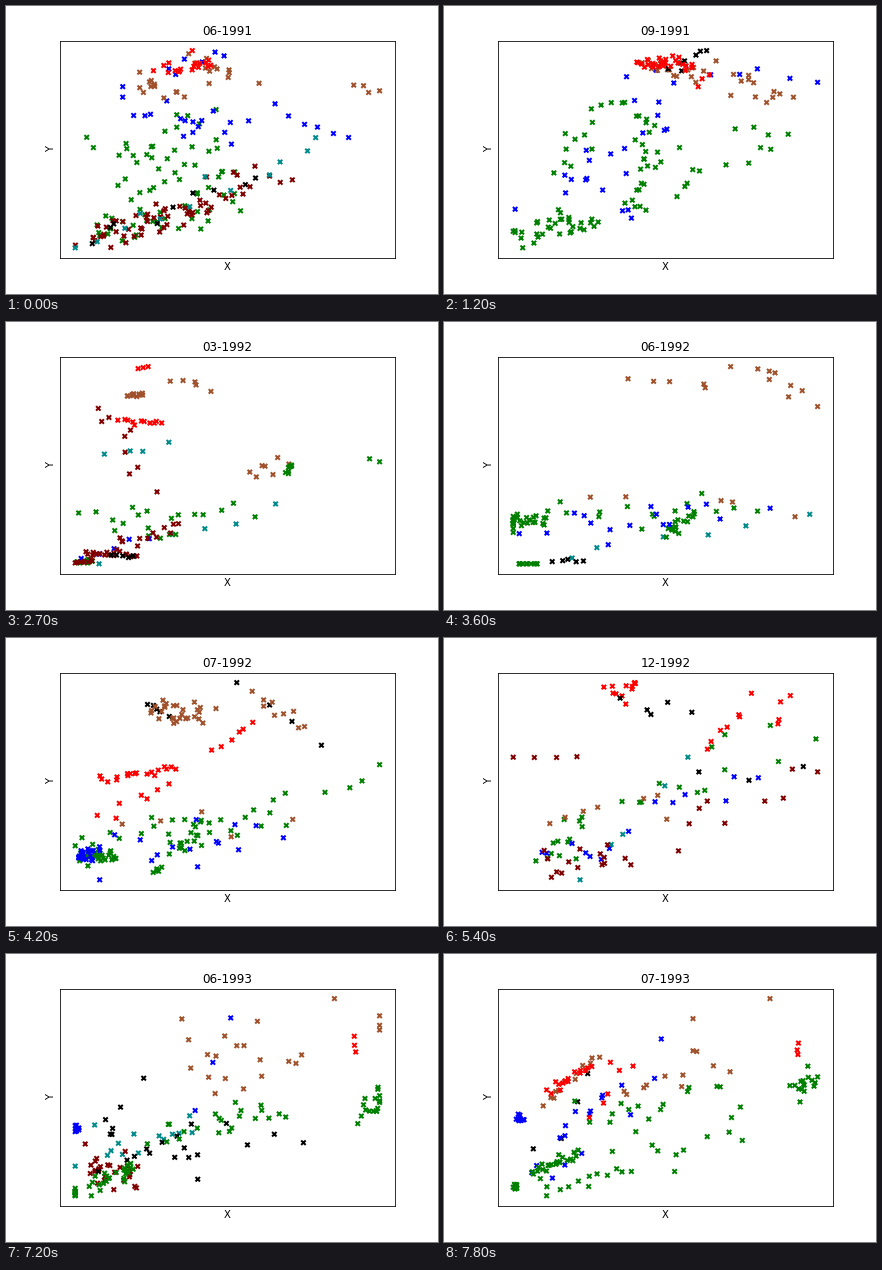
Write a matplotlib script that moves like this. It is 432x288 px and loops after 8000 ms.

```python
import numpy as np
import matplotlib.pyplot as plt
from matplotlib.animation import FuncAnimation

TICK, HOLD, TICKS = 100, 3, 80
MONTHS = "06 07 07 08 09 10 12 12 01 03 04 05".split()
LEFT, RIGHT, TOP, BOTTOM = 69.2, 373.6, 44.6, 241.8
DRIFT = 7

key_months = {}


def month(step, *bands):
    key_months[step] = bands


def band(colour, count, start, end=None, spread=5):
    """Points strewn along a line from start to end, in pixels from the top left."""
    return colour, count, np.array(start), np.array(end or start), spread


month(
    0,
    band("green", 36, (95, 225), (228, 188), 10),
    band("green", 26, (120, 168), (215, 155), 13),
    band("green", 12, (90, 145), (215, 108), 10),
    band("blue", 18, (120, 115), (240, 125), 12),
    band("blue", 6, (160, 71), (228, 55)),
    band("blue", 6, (270, 106), (343, 136), 2),
    band("sienna", 13, (137, 84), (172, 96)),
    band("sienna", 12, (187, 64), (238, 78), 6),
    band("sienna", 4, (350, 86), (373, 92), 2),
    band("red", 18, (162, 72), (208, 66), 4),
    band("maroon", 55, (82, 233), (230, 188), 8),
    band("maroon", 6, (230, 162), (282, 168)),
    band("darkcyan", 12, (69, 238), (328, 141), 7),
    band("black", 9, (89, 227), (255, 172)),
)
month(
    4,
    band("green", 34, (76, 224), (140, 212), 8),
    band("green", 14, (108, 160), (165, 90), 6),
    band("green", 25, (178, 200), (188, 108), 8),
    band("green", 14, (210, 190), (300, 110), 14),
    band("blue", 16, (105, 185), (210, 105), 14),
    band("blue", 5, (134, 170), (180, 214)),
    band("blue", 8, (170, 71), (334, 73)),
    band("sienna", 20, (182, 56), (230, 70), 6),
    band("sienna", 13, (255, 60), (310, 102), 7),
    band("black", 7, (210, 66), (238, 45), 4),
    band("red", 22, (180, 58), (215, 58), 3),
    band("red", 9, (222, 58), (236, 80)),
)
month(
    9,
    band("sienna", 12, (122, 74), (138, 71), 1),
    band("sienna", 5, (160, 64), (212, 67)),
    band("sienna", 7, (243, 152), (284, 139)),
    band("red", 11, (113, 99), (157, 101), 1.5),
    band("red", 3, (132, 47), (142, 45), 0),
    band("darkcyan", 4, (105, 134), (154, 115), 6),
    band("darkcyan", 6, (100, 231), (266, 181), 6),
    band("green", 8, (282, 148), spread=2),
    band("green", 10, (70, 240), (86, 239), 1),
    band("green", 13, (82, 188), (240, 192), 7),
    band("green", 7, (108, 213), (180, 209)),
    band("green", 2, (363, 137), (373, 140), 0),
    band("blue", 5, (78, 236), (140, 215), 3),
    band("maroon", 8, (70, 240), (86, 239), 1),
    band("maroon", 18, (80, 232), (130, 232), 1.5),
    band("maroon", 9, (92, 79), (143, 165), 7),
    band("maroon", 12, (112, 222), (172, 208), 4),
    band("black", 5, (105, 233), (126, 233), 1),
)
month(
    14,
    band("green", 28, (72, 215), (108, 213), 3.5),
    band("green", 18, (165, 210), (192, 190), 6),
    band("green", 18, (76, 197), (268, 175), 8),
    band("green", 7, (240, 165), (372, 131), 8),
    band("green", 5, (148, 229), spread=2.5),
    band("blue", 18, (70, 218), (88, 212), 4),
    band("blue", 16, (96, 210), (252, 190), 12),
    band("black", 5, (137, 66), (157, 79), 2),
    band("black", 4, (226, 45), (304, 104), 3),
    band("sienna", 28, (145, 68), (188, 80), 7),
    band("sienna", 9, (237, 58), (290, 90)),
    band("sienna", 5, (116, 180), (265, 180), 8),
    band("red", 18, (92, 141), (166, 128), 2.5),
    band("red", 7, (92, 170), (158, 152)),
    band("red", 6, (198, 112), (243, 92)),
)
month(
    18,
    band("red", 12, (163, 62), (195, 52)),
    band("red", 7, (264, 112), (305, 68)),
    band("red", 4, (332, 92), (348, 66), 3),
    band("black", 5, (171, 76), (246, 87), 6),
    band("black", 3, (259, 137), (367, 135), 6),
    band("green", 8, (177, 165), (282, 150), 9),
    band("green", 5, (270, 106), (367, 115), 9),
    band("green", 13, (99, 222), (142, 188), 7),
    band("blue", 7, (188, 185), (315, 140), 8),
    band("blue", 7, (105, 214), (170, 222), 6),
    band("darkcyan", 5, (133, 238), (235, 112), 8),
    band("sienna", 7, (106, 182), (231, 166), 7),
    band("maroon", 15, (105, 234), (180, 210), 8),
    band("maroon", 9, (226, 190), (373, 135), 14),
    band("maroon", 4, (70, 123), (134, 123), 0.5),
)
month(
    21,
    band("red", 17, (93, 105), (145, 76)),
    band("blue", 12, (75, 168), (110, 90)),
    band("blue", 9, (80, 185), (105, 175), 7),
    band("blue", 6, (142, 130), (168, 45), 6),
    band("green", 38, (75, 185), (150, 175), 16),
    band("green", 14, (90, 110), (170, 125), 10),
    band("green", 7, (201, 170), (256, 160), 6),
    band("green", 3, (361, 109), spread=1),
    band("darkcyan", 14, (90, 182), (207, 150), 9),
    band("black", 14, (95, 185), (178, 225), 12),
    band("black", 5, (166, 160), (286, 180), 9),
    band("sienna", 16, (102, 98), (150, 70), 7),
    band("sienna", 6, (160, 92), (222, 108), 8),
    band("sienna", 3, (156, 50), (263, 60), 4),
    band("sienna", 3, (365, 87), (372, 76), 2),
    band("maroon", 28, (70, 204), (120, 212), 7),
    band("maroon", 18, (155, 225), (217, 228), 7),
    band("maroon", 16, (112, 195), (292, 180), 12),
)
month(
    26,
    band("black", 4, (97, 207), (144, 121), 4),
    band("blue", 9, (77, 165), spread=2.3),
    band("blue", 14, (92, 226), (160, 130), 8),
    band("blue", 3, (191, 161), (221, 82), 4),
    band("sienna", 14, (98, 150), (154, 102), 3),
    band("sienna", 11, (180, 125), (280, 107), 10),
    band("sienna", 2, (249, 65), (326, 45), 0),
    band("red", 15, (104, 139), (146, 113), 2.5),
    band("red", 6, (150, 160), (190, 100), 6),
    band("red", 3, (352, 90), (354, 101), 1),
    band("green", 16, (352, 139), (372, 122), 6),
    band("green", 15, (142, 160), (277, 140), 8),
    band("green", 11, (175, 190), (302, 198), 12),
    band("green", 10, (71, 232), spread=1.3),
    band("green", 24, (88, 220), (132, 202), 4),
    band("green", 12, (101, 237), (186, 216), 4),
)


def strew(rng, count, start, end, spread, drift):
    """Place the points of a band, moved as a whole by a random drift."""
    along = np.linspace(0, 1, count)[:, None]
    jitter = rng.normal(0, spread, (count, 2)) + rng.normal(0, 1, 2) * drift
    return start + (end - start) * along + jitter


def fit(values, low, high):
    values = np.clip(values, low, high)
    return np.interp(values, (values.min(), values.max()), (low, high))


def month_points(step):
    """Points and colours of one month; months between two keys mix their bands."""
    rng = np.random.default_rng(step)
    before = max(k for k in key_months if k <= step)
    after = min(k for k in key_months if k >= step)
    drift, bands = 0, key_months[before]
    if before != after:
        share = (step - before) / (after - before)
        drift = DRIFT
        bands = [b for b in key_months[before] if rng.random() > share]
        bands += [b for b in key_months[after] if rng.random() < share]
    points = np.vstack([strew(rng, *b[1:], drift) for b in bands])
    colours = [colour for colour, count, *_ in bands for _ in range(count)]
    x, y = points.T
    return np.column_stack([fit(x, LEFT, RIGHT), fit(y, TOP, BOTTOM)]), colours


def label(step):
    return f"{MONTHS[step % 12]}-{1991 + (step + 4) // 12}"


fig, ax = plt.subplots(figsize=(6, 4), dpi=72)
fig.subplots_adjust(bottom=0.125)
ax.set(xlim=(54, 388.8), ylim=(252, 34.56), xticks=[], yticks=[], xlabel="X", ylabel="Y")
marks = ax.scatter([], [], s=20, marker="x", linewidths=2)
title = ax.set_title("")


def update(tick):
    step = tick // HOLD
    points, colours = month_points(step)
    marks.set_offsets(points)
    marks.set_color(colours)
    title.set_text(label(step))
    return marks, title


anim = FuncAnimation(fig, update, frames=TICKS, interval=TICK, repeat=True, repeat_delay=0)
plt.show()
```
